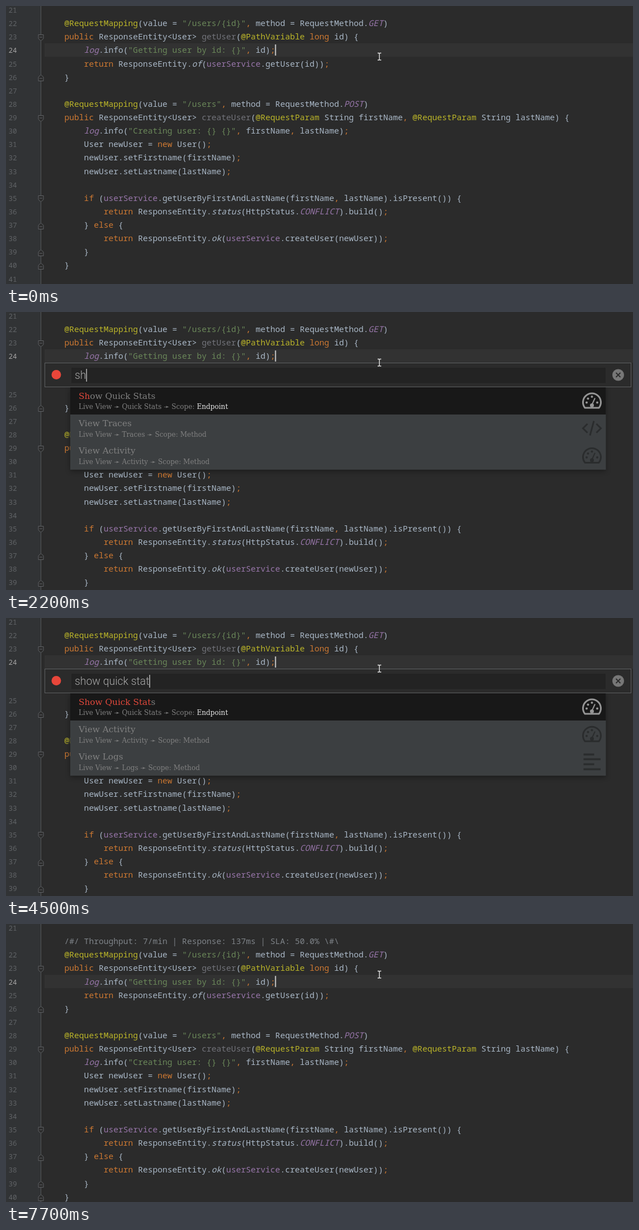
Recreate the animation shown at these times as an HTML page. Size 1122 px wide and 499 px high, loop 8000 ms.

```html
<!DOCTYPE html>
<html lang="en">
<head>
<meta charset="utf-8">
<title>Code editor with command palette</title>
<style>
  html, body { margin: 0; width: 100%; height: 100%; overflow: hidden; background: #2b2b2b; }
  svg { display: block; width: 1122px; height: 499px; }
  text { white-space: pre; fill: #a9b7c6; }
  .code { font: 14.63px "Noto Sans Mono", "DejaVu Sans Mono", monospace; font-variant-ligatures: none; }
  .code .number { font-size: 12.7px; fill: #606366; }
  .code .current { fill: #a4a3a3; }
  .note { fill: #9876aa; fill: #7e8388; }
  .annotation { fill: #bbb529; }
  .keyword { fill: #cc7832; }
  .string { fill: #6a8759; }
  .unused { fill: #72737a; }
  .field { fill: #9876aa; }
  .constant { fill: #9876aa; font-style: italic; }
  .static { font-style: italic; }
  .fold { fill: #2b2b2b; stroke: #606366; }
  .query { font: 300 19.4px Roboto, sans-serif; fill: #a9a9a9; }
  .title { font: 15.3px "DejaVu Serif", "Noto Serif", serif; fill: #808080; }
  .path { font: 12.1px "DejaVu Serif", "Noto Serif", "DejaVu Sans", serif; fill: #808080; }
  .red { fill: #e1483b; }
  .white { fill: #e6e6e6; }
  .icon { fill: none; stroke: currentColor; stroke-width: 3; }
</style>
</head>
<body>
<svg id="stage" viewBox="0 0 1122 499">
  <rect width="1122" height="499" fill="#2b2b2b"/>
  <rect width="62" height="499" fill="#313335"/>
  <path d="M62.5 0V499" stroke="#555759"/>
  <g class="code">
    <g id="first"></g>
    <text id="note" class="note" x="104.5" y="36">/#/ Throughput: 7/min | Response: 137ms | SLA: 50.0% \#\</text>
    <g id="upper">
      <rect x="69" y="67" width="1053" height="24" fill="#323232"/>
      <g id="upperLines"></g>
      <rect id="caret" x="481.3" y="69" width="2" height="20" fill="#c8c8c8"/>
    </g>
    <g id="lower"></g>
  </g>
  <g id="popup">
    <g id="menu">
      <rect x="115" y="134" width="958.5" height="149" fill="#3c3f41" style="filter: drop-shadow(0 3px 4px #0005)"/>
      <rect x="115" y="134" width="958.5" height="50" fill="#181818"/>
      <g id="items"></g>
    </g>
    <rect x="69.5" y="91.5" width="1049" height="43" fill="#2b2b2b" stroke="#5e6062"/>
    <rect x="117" y="100" width="956" height="27.5" fill="#232323"/>
    <circle cx="90" cy="112.5" r="8.5" fill="#e8463a"/>
    <circle cx="1095.5" cy="113" r="10.5" fill="#777"/>
    <path d="M1091.5 109l8 8m0-8l-8 8" stroke="#2b2b2b" stroke-width="1.8"/>
    <text id="query" class="query" x="123" y="120"></text>
    <rect id="queryCaret" y="102" width="1.3" height="23" fill="#d0d0d0"/>
  </g>
  <path id="pointer" fill="none" d="M665 84.5h2.2l1 1 1-1h2.2M668.2 85.5V96M665 97h2.2l1-1 1 1h2.2" stroke="#e4e4e4" stroke-width="1.4"/>
</svg>
<script>
const $ = id => document.getElementById(id);
const LOOP = 8000, ROW = 24.13, FIRST_LINE = 21;

const source = `
@RequestMapping(value = "/users/{id}", method = RequestMethod.GET)
public ResponseEntity<User> getUser(@PathVariable long id) {
    log.info("Getting user by id: {}", id);
    return ResponseEntity.of(userService.getUser(id));
}

@RequestMapping(value = "/users", method = RequestMethod.POST)
public ResponseEntity<User> createUser(@RequestParam String firstName, @RequestParam String lastName) {
    log.info("Creating user: {} {}", firstName, lastName);
    User newUser = new User();
    newUser.setFirstname(firstName);
    newUser.setLastname(lastName);

    if (userService.getUserByFirstAndLastName(firstName, lastName).isPresent()) {
        return ResponseEntity.status(HttpStatus.CONFLICT).build();
    } else {
        return ResponseEntity.ok(userService.createUser(newUser));
    }
}
`.split('\n');

const tokens = [
  ['string', '"[^"]*"'],
  ['annotation', '@\\w+'],
  ['keyword', '\\b(?:public|return|new|if|else|long)\\b|[;,]'],
  ['unused', '(?<=> )\\w+'],
  ['field', '\\buserService\\b'],
  ['constant', '\\b(?:GET|POST|CONFLICT|log)\\b'],
  ['static', '\\b(?:of|status|ok)(?=\\()'],
];
const tokenPattern = new RegExp(tokens.map(([name, rule]) => `(?<${name}>${rule})`).join('|'), 'g');

const escapeText = s => s.replace(/&/g, '&amp;').replace(/</g, '&lt;');
const span = (name, s) => `<tspan class="${name}">${escapeText(s)}</tspan>`;

function highlight(line) {
  let html = '', end = 0;
  for (const match of line.matchAll(tokenPattern)) {
    const name = tokens.find(([key]) => match.groups[key] !== undefined)[0];
    html += escapeText(line.slice(end, match.index)) + span(name, match[0]);
    end = match.index + match[0].length;
  }
  return html + escapeText(line.slice(end));
}

function foldMark(number, y) {
  const down = [23, 29, 35].includes(number);
  if (!down && ![26, 37, 39, 40].includes(number)) return '';
  return `<g class="fold" transform="translate(62.5 ${y}) scale(1 ${down ? 1 : -1})">
    <path d="M-4.5-5.5h9v7l-4.5 4-4.5-4z"/><path d="M-2.5-1h5"/></g>`;
}

function codeRow(line, index) {
  const number = FIRST_LINE + index, y = 7 + ROW * index;
  return `<text class="number ${number === 24 ? 'current' : ''}" x="4.5" y="${y + 5}">${number}</text>
    <text x="104.5" y="${y + 5}">${highlight(line)}</text>${foldMark(number, Math.round(y + 1.5))}`;
}

const rows = source.map(codeRow);
$('first').innerHTML = rows[0];
$('upperLines').innerHTML = rows.slice(1, 4).join('');
$('lower').innerHTML = rows.slice(4).join('');

// Icons are centred on 0,0.
const icons = {
  gauge: `<path stroke-linejoin="round" d="M-12.5 12.5A16 16 0 1 1 12.5 12.5Z"/>
    <path stroke-width="2" d="M0 7L5.5-5"/>
    <g fill="currentColor" stroke="none"><circle cy="8" r="3.5"/><circle cx="-9.5" cy="3" r="2"/>
    <circle cx="-7" cy="-4" r="2"/><circle cy="-7.5" r="2"/><circle cx="9.5" cy="3" r="2"/></g>`,
  code: '<path d="M-8-8L-16 0-8 8M8-8L16 0 8 8M3.5-13L-3.5 13"/>',
  lines: '<path stroke-width="3.5" d="M-15-13H4M-15-4.5H15.5M-15 4.5H4M-15 13.5H15.5"/>',
};

const commands = {
  stats: ['Show Quick Stats', 'Quick Stats', 'Endpoint', 'gauge'],
  logs: ['View Logs', 'Logs', 'Method', 'lines'],
  watch: ['Watch Log', 'Log', 'Expression', 'lines'],
  traces: ['View Traces', 'Traces', 'Method', 'code'],
  activity: ['View Activity', 'Activity', 'Method', 'gauge'],
};

function menuItem(key, index, typed) {
  const [title, group, scope, icon] = commands[key];
  const matched = index === 0 ? typed : 0;
  const y = 134 + 49.2 * index;
  return `<text class="title" x="130" y="${y + 21.7}">${span('red', title.slice(0, matched))}${title.slice(matched)}</text>
    <text class="path" x="130" y="${y + 40.3}">Live View ➛ ${group} ➛ Scope: ${span(scope === 'Method' ? '' : 'white', scope)}</text>
    <g class="icon" color="${index ? '#2a2c2d' : '#969696'}" transform="translate(1048.5 ${y + 25.5})">${icons[icon]}</g>`;
}

// Each step holds from its time until the next one.
const queries = [
  [1300, ''],
  [2100, 's'],
  [2200, 'sh', 'traces', 'activity'],
  [2400, 'show', 'logs', 'watch'],
  [2900, 'show ', 'logs', 'watch'],
  [3000, 'show q', 'activity', 'logs'],
  [3300, 'show qu', 'activity', 'logs'],
  [3500, 'show qui', 'traces', 'activity'],
  [3600, 'show quic', 'traces', 'activity'],
  [3700, 'show quick', 'traces', 'activity'],
  [3800, 'show quick ', 'traces', 'activity'],
  [4000, 'show quick s', 'logs', 'watch'],
  [4300, 'show quick sta', 'traces', 'activity'],
  [4500, 'show quick stat', 'activity', 'logs'],
  [4800, 'show quick stats', 'activity', 'logs'],
  [6000, null],
];
const caretHidden = [[200, 700], [1100, 1300], [6000, 6100], [7100, 7700]];
const queryCaretHidden = [[1800, 2100], [5300, 5900]];
const NOTE_START = 6400;

const within = (spans, t) => spans.some(([from, to]) => t >= from && t < to);
const show = (id, on) => $(id).style.display = on ? '' : 'none';
const shift = (id, y) => $(id).setAttribute('transform', `translate(0 ${y})`);

let current;
function applyQuery(step) {
  if (step === current) return;
  current = step;
  const text = step ? step[1] : null;
  const open = text !== null;
  show('popup', open);
  if (!open) return;
  const suggestions = step.slice(2);
  $('query').textContent = text;
  $('query').classList.toggle('red', text === 'show quick stats');
  $('queryCaret').setAttribute('x', 123 + (text ? $('query').getComputedTextLength() : 0));
  show('menu', suggestions.length);
  $('items').innerHTML = ['stats', ...suggestions].map((key, i) => menuItem(key, i, text.length)).join('');
}

function render(t) {
  const step = queries.findLast(([from]) => t >= from);
  const open = Boolean(step) && step[1] !== null;
  const noted = t >= NOTE_START;
  applyQuery(step);
  show('caret', !within(caretHidden, t));
  show('queryCaret', !within(queryCaretHidden, t));
  show('note', noted);
  shift('upper', noted ? 24.2 : 0);
  shift('lower', noted ? 24.2 : open ? 44 : 0);
}

const start = performance.now();
function tick() {
  render((performance.now() - start) % LOOP);
  requestAnimationFrame(tick);
}
show('popup', false);
tick();
</script>
</body>
</html>
```
